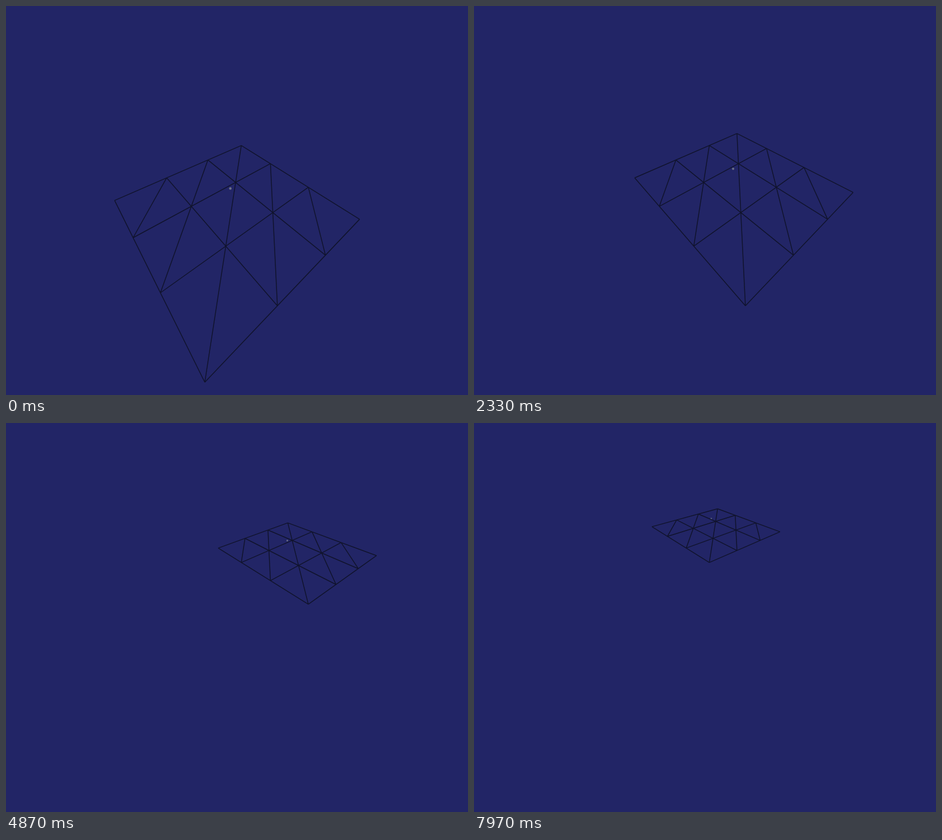
An HTML page with a canvas for the animation above (8 s loop, 815 by 687 pixels).

```html
<!DOCTYPE html>
<html lang="en">
<head>
<meta charset="utf-8">
<title>Roaming grid</title>
<style>
  html, body { margin: 0; width: 100%; height: 100%; overflow: hidden; background: #222566; }
  canvas { display: block; }
</style>
</head>
<body>
<canvas id="stage" width="815" height="687"></canvas>
<script>
const ctx = document.getElementById('stage').getContext('2d');
const LOOP = 8000;
const SIZE = 3;       // cells per side of the visible patch
const FRESH = 150;    // how long a new strip stays darker, in ms

// Start time and near corner (u, v) of the visible patch
const patches = [
  [0, 0, 0], [1865, 1, 0], [3250, 2, 0], [4290, 2, 1],
  [4500, 3, 1], [5660, 3, 2], [6950, 3, 3]
];

// Dot path on the ground: time, u, v
const path = [
  [230, 1.81, 1.927], [1830, 2.44, 1.946], [3070, 3.38, 2.009],
  [4130, 4.35, 2.536], [5730, 5.36, 3.792], [6730, 5.54, 4.708],
  [7970, 5.07, 5.32]
];

const depth = (u, v) => 1 + 0.2555 * u + 0.3124 * v;

// Ground coordinates to screen
function project(u, v) {
  const w = depth(u, v);
  return [(250.4 * u + 6.8 * v + 350.7) / w, (0.15 * u + 0.07 * v + 664) / w + 0.5];
}

function slope(i, k) {
  if (i === 0) return 0;
  const a = path[i - 1], b = path[Math.min(i + 1, path.length - 1)];
  return (b[k] - a[k]) / (b[0] - a[0]);
}

// Cubic Hermite interpolation along the path
function dotAt(t) {
  const last = path.length - 1;
  t = Math.min(Math.max(t, path[0][0]), path[last][0]);
  let i = 0;
  while (i < last - 1 && t > path[i + 1][0]) i++;
  const a = path[i], b = path[i + 1], span = b[0] - a[0];
  const s = (t - a[0]) / span, s2 = s * s, s3 = s2 * s;
  return [1, 2].map(k =>
    (2 * s3 - 3 * s2 + 1) * a[k] + (3 * s2 - 2 * s3) * b[k] +
    span * ((s3 - 2 * s2 + s) * slope(i, k) + (s3 - s2) * slope(i + 1, k)));
}

function line(u0, v0, u1, v1) {
  ctx.moveTo(...project(u0, v0));
  ctx.lineTo(...project(u1, v1));
}

// Triangulated block of nu by nv cells
function mesh(u, v, nu, nv, color) {
  ctx.strokeStyle = color;
  ctx.beginPath();
  for (let i = 0; i <= nu; i++) line(u + i, v, u + i, v + nv);
  for (let j = 0; j <= nv; j++) line(u, v + j, u + nu, v + j);
  for (let k = 1 - nv; k < nu; k++) {
    const i = Math.max(k, 0), j = Math.max(-k, 0);
    const n = Math.min(nu - i, nv - j);
    line(u + i, v + j, u + i + n, v + j + n);
  }
  ctx.stroke();
}

function draw(t) {
  ctx.fillStyle = '#222566';
  ctx.fillRect(0, 0, 815, 687);

  let n = patches.length - 1;
  while (patches[n][0] > t) n--;
  const [start, u, v] = patches[n];
  ctx.lineWidth = 1.5;
  mesh(u, v, SIZE, SIZE, '#10132c');
  if (n > 0 && t - start < FRESH) {
    const alongU = u > patches[n - 1][1];
    if (alongU) mesh(u + SIZE - 1, v, 1, SIZE, '#03040f');
    else mesh(u, v + SIZE - 1, SIZE, 1, '#03040f');
  }

  const [du, dv] = dotAt(t), [x, y] = project(du, dv);
  ctx.fillStyle = '#6c7187';
  ctx.beginPath();
  ctx.arc(x, y, 4.6 / depth(du, dv), 0, Math.PI * 2);
  ctx.fill();
}

const begin = performance.now();
function tick() {
  draw((performance.now() - begin) % LOOP);
  requestAnimationFrame(tick);
}
tick();
</script>
</body>
</html>
```
